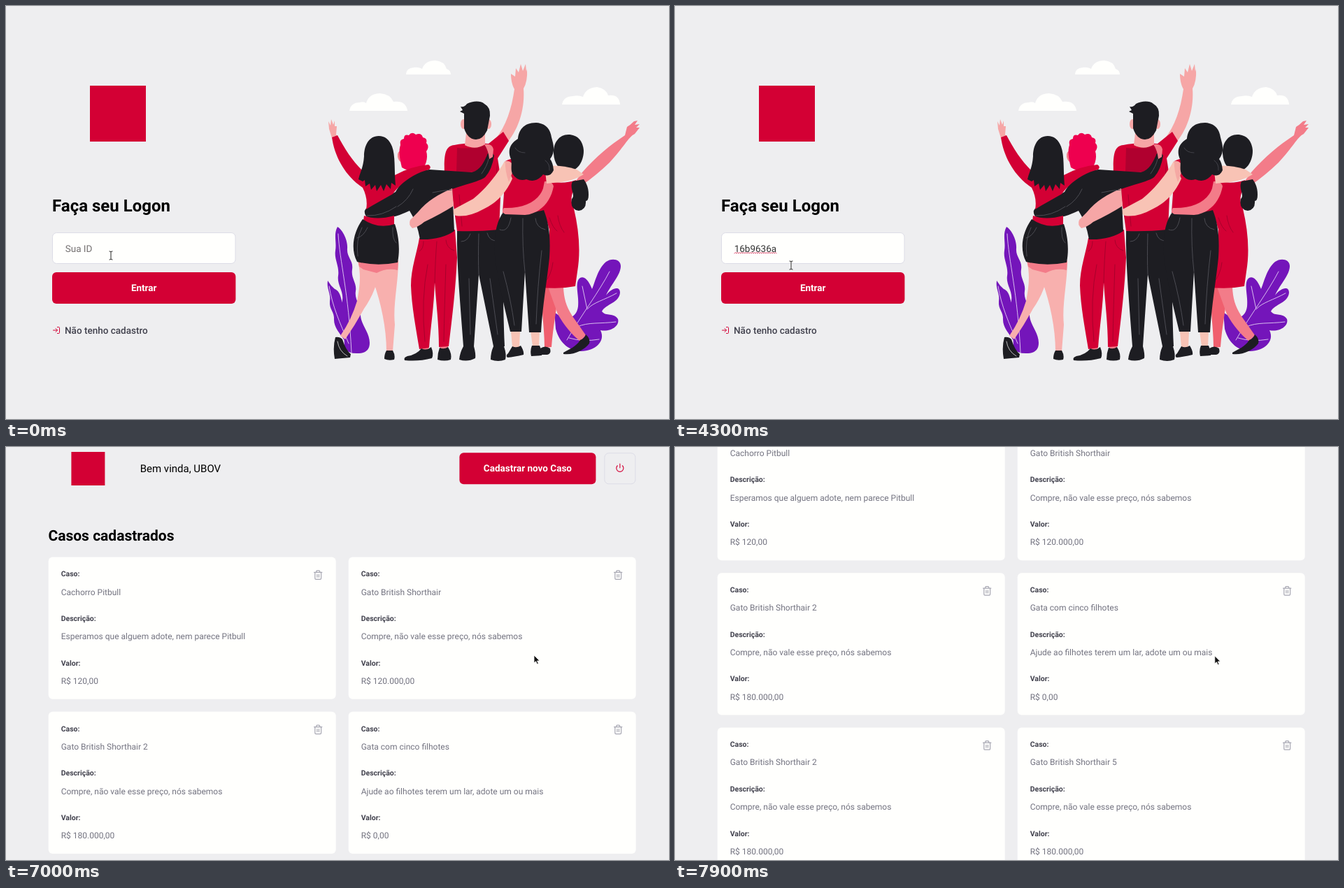
An HTML page that plays this animation: 948 px wide and 591 px high, repeating every 8000 ms.

```html
<!DOCTYPE html>
<html lang="pt-BR">
<head>
<meta charset="utf-8">
<title>Logon</title>
<style>
html, body { margin: 0; width: 100%; height: 100%; overflow: hidden; background: #eeeef0; }
svg { display: block; width: 948px; height: 591px; }
text { font-family: Roboto, sans-serif; text-rendering: geometricPrecision; white-space: pre; }
</style>
</head>
<body>
<svg id="stage" viewBox="0 0 948 591" xmlns="http://www.w3.org/2000/svg"></svg>
<script>
const LOOP = 8000;
const RED = '#d30034', WHITE = '#fffffd', BORDER = '#dcdce6', INK = '#41414d', GRAY = '#737380';
const DARK = '#1d1d22', SEAM = '#4b4b52', DEEP = '#a8002c', HOT = '#ee004f';
const PINK = '#f6a6a6', BLUSH = '#f8b0ae', ROSE = '#f37c89', PEACH = '#f8c3b5', PURPLE = '#7415ba', VEIN = '#e3cff3';

const shape = (fill, d) => `<path fill="${fill}" d="${d}"/>`;
const line = (color, width, d) =>
  `<path fill="none" stroke="${color}" stroke-width="${width}" stroke-linecap="round" stroke-linejoin="round" d="${d}"/>`;
const text = (x, y, size, weight, fill, s, extra = '') =>
  `<text x="${x}" y="${y}" font-size="${size}" font-weight="${weight}" fill="${fill}" ${extra}>${s}</text>`;
const box = (x, y, w, h, fill, stroke = 'none', r = 6) =>
  `<rect x="${x}" y="${y}" width="${w}" height="${h}" rx="${r}" fill="${fill}" stroke="${stroke}"/>`;
const icon = (x, y, size, color, d) =>
  `<g transform="translate(${x} ${y}) scale(${size / 24})">${line(color, 2, d)}</g>`;
const group = (id, body) => `<g id="${id}">${body}</g>`;
const centered = 'text-anchor="middle"';

function scenery() {
  return [
    shape(WHITE, 'M572 98Q572 89 583 88Q590 87 595 90Q599 78 614 78Q627 79 630 90Q636 92 636 98Z'),
    shape(WHITE, 'M491 150Q493 138 506 138Q511 136 515 139Q519 125 535 125Q549 126 554 137Q572 135 574 150Z'),
    shape(WHITE, 'M795 141Q797 129 811 129Q818 127 825 130Q829 117 845 116Q858 118 861 128Q877 126 878 141Z'),
    shape(PURPLE, 'M474 316C468 327 473 337 471 350C469 363 477 372 475 386C473 399 483 407 481 421C480 433 486 444 483 460L484 490Q489 498 505 497Q520 496 520 482C520 466 506 455 507 440C508 429 498 421 500 408C502 396 493 390 495 377C497 364 487 360 488 347C489 334 480 319 474 316Z'),
    shape(PURPLE, 'M460 393C458 405 465 411 463 423C462 434 470 438 469 449C469 460 477 468 485 480L495 462C486 450 491 439 484 430C478 422 480 409 470 405Q464 400 460 393Z'),
    line(VEIN, .9, 'M475 326C477 365 490 410 494 496M462 401C467 431 477 452 490 483'),
    shape(PURPLE, 'M784 438C802 453 816 446 818 430C820 415 812 395 821 389C829 385 835 398 838 405C842 396 846 376 858 366C866 360 879 362 879 372C879 385 866 397 858 414C866 403 878 400 878 410C877 425 858 426 852 437C858 445 869 438 875 448C878 458 864 467 850 464C858 480 842 494 822 494C806 493 792 484 786 462Z'),
    line(VEIN, .9, 'M863 380C848 409 824 440 802 478M824 401L831 434M873 411C855 421 840 424 832 433M800 449L819 458M872 452C850 455 832 452 817 459M848 477Q825 481 805 475')
  ].join('');
}

function ponytailWoman() {
  return [
    shape(ROSE, 'M806 262L824 238C843 216 864 199 885 185L888 173Q893 170 898 165L903 164L899 170L906 169L901 174L906 174L899 183C890 187 883 203 863 224Q838 248 812 264Z'),
    shape('#f05f6e', 'M767 400L791 402C788 430 782 460 780 488L770 489C770 456 764 430 767 400Z'),
    shape(ROSE, 'M775 402L797 403C798 418 800 428 810 444Q820 458 829 471L821 480C809 470 798 457 789 441Z'),
    shape(DARK, 'M764 490Q771 485 778 490Q780 498 774 499L763 499ZM797 496C805 491 815 488 821 478Q827 476 829 470Q836 476 834 483C826 493 811 500 797 498Z'),
    shape(RED, 'M774 250Q796 256 815 249C812 266 804 274 812 290C819 320 822 350 817 380L814 401Q788 406 761 402C767 385 775 370 776 355L777 320L768 290Z'),
    line(DEEP, 1, 'M789 300Q791 315 798 324M777 303Q782 318 788 322M770 396Q780 385 782 367'),
    shape(DARK, 'M804 184C791 184 782 196 783 211C784 226 791 236 804 237C817 236 826 223 826 207C825 193 817 184 804 184Z')
  ].join('');
}

function tallMan() {
  return [
    shape(PINK, 'M700 190C715 172 723 147 727 119C723 112 722 103 722 97L728 101L729 89L733 95L736 83L739 93L743 83L744 94L745 90Q746 108 740 118C742 144 735 173 717 195Z'),
    shape(DARK, 'M645 320L704 318C712 350 710 420 713 487H697L676 384L669 487H654C650 430 644 370 645 320Z'),
    line(SEAM, 1, 'M676 326Q675 360 676 384M651 337Q660 337 664 326M688 325Q691 337 703 336M662 390L664 470M692 390L703 470'),
    shape(DARK, 'M654 487H669Q672 498 671 504Q660 510 648 506Q649 496 654 487ZM697 487H712Q716 499 714 506Q704 510 693 506Q693 496 697 487Z'),
    shape(RED, 'M641 199Q660 195 690 197L711 180L719 193L703 218L708 250L705 320Q675 323 645 322L637 264L627 240C626 213 628 200 641 199Z'),
    shape('#b0002f', 'M645 203Q665 205 686 199L697 213L683 237L644 238Z'),
    shape(PINK, 'M658 182H685V198Q671 207 656 199Z'),
    `<ellipse cx="654" cy="169" rx="4" ry="7" fill="${PINK}"/><ellipse cx="690" cy="169" rx="4" ry="7" fill="${PINK}"/>`,
    shape(DARK, 'M655 154L649 151L653 149L650 144Q656 145 659 140C667 136 678 135 684 140Q693 145 692 157L688 178Q681 192 671 191Q660 190 655 175Z'),
    line(DEEP, 1, 'M648 270L652 315M703 225Q700 240 703 255')
  ].join('');
}

function curlyWoman() {
  return [
    shape(PEACH, 'M722 466H735L734 488H724ZM750 465H763L762 487H753Z'),
    shape(DARK, 'M724 487Q730 490 736 486Q741 494 740 499Q727 502 717 503Q714 500 718 497ZM752 486H763Q767 496 766 500L751 501Q749 493 752 486Z'),
    shape(RED, 'M714 222Q736 211 770 229Q785 239 781 254Q770 274 771 294Q741 301 710 296L712 268Q705 245 714 222Z'),
    shape(DARK, 'M712 294C698 310 696 345 701 372C706 405 715 440 721 466H737L742 380L748 467H765C767 430 774 390 777 360C779 330 776 310 769 292Q742 300 712 294Z'),
    line(SEAM, 1, 'M739 304Q738 345 742 380M706 320Q718 325 722 303M757 304Q758 317 771 320M711 380Q722 420 727 457M766 350Q760 400 758 455'),
    shape(PEACH, 'M713 222C704 238 689 259 668 276L640 291Q636 296 643 300Q661 303 684 290Q711 277 724 247Z'),
    shape('#f5a9a4', 'M714 222Q724 220 726 233L719 252Q713 235 714 222Z'),
    shape(ROSE, 'M770 251Q781 250 783 258C779 280 764 297 742 299L714 298Q707 295 712 289C739 290 761 281 768 261Z'),
    shape(DARK, 'M826 248Q833 257 833 270Q833 279 829 279Q830 291 819 293Q806 291 809 276C815 270 805 262 810 251Z'),
    shape(PEACH, 'M770 229Q794 227 816 234L826 241Q814 249 794 252L773 254Z'),
    shape(DARK, 'M758 167C739 167 733 179 732 190C720 197 717 208 722 219C724 226 721 233 724 240Q732 252 744 248Q758 254 768 241Q778 246 783 235Q782 224 778 219C786 208 783 199 780 188Q777 168 758 167Z'),
    line(SEAM, .8, 'M771 221Q778 226 777 235M728 203Q732 210 742 210')
  ].join('');
}

function redHairMan() {
  return [
    shape(ROSE, 'M594 484H604V494H596ZM620 484H632V493H621Z'),
    shape(RED, 'M591 332L642 320L645 360C643 405 638 445 633 487L619 488C619 455 615 425 613 396C612 430 607 460 605 489L591 491C586 460 580 430 579 400C579 375 588 352 591 332Z'),
    line(DEEP, 1, 'M616 337Q614 360 613 396M597 337Q597 348 591 351M629 335Q630 347 641 350M603 370Q593 420 599 480M629 370Q627 430 626 480'),
    shape(DARK, 'M594 490Q601 494 608 488Q612 498 609 504Q590 509 570 507Q568 503 574 501Q587 499 594 490ZM620 489Q626 492 632 488Q638 498 636 506Q627 509 617 506Q617 497 620 489Z'),
    shape(ROSE, 'M573 222H598V238L574 240ZM566 207Q559 207 560 216Q562 225 569 223Z'),
    shape(DARK, 'M605 234C580 237 566 250 557 266L519 287Q509 292 515 301Q525 308 542 304C558 302 570 296 577 293Q588 310 592 334Q622 335 641 322L638 262C656 255 675 252 685 245Q695 234 698 214Q694 207 689 211C684 222 679 235 666 238Z'),
    shape(ROSE, 'M684 198Q695 196 697 205L696 216L691 219Q690 207 684 198Z'),
    shape(PINK, 'M638 261C619 269 602 279 589 295L578 306Q575 313 581 318Q590 316 598 309C614 301 628 294 640 286Z'),
    line(SEAM, 1, 'M610 267Q623 264 637 263M582 262Q575 278 560 287M680 240Q688 229 690 219'),
    shape(HOT, 'M566 231C563 218 561 207 564 199Q562 191 569 190Q569 183 576 185Q580 179 586 184Q594 181 596 188Q603 189 601 196Q606 201 601 208C604 218 600 230 593 235Q578 239 566 231Z')
  ].join('');
}

function longHairWoman() {
  return [
    shape(PINK, 'M466 189L462 176L461 165L464 171L465 162L468 170L470 164L470 172L473 172L472 184L475 188Z'),
    shape(BLUSH, 'M503 364L536 367C533 395 523 418 512 433Q500 455 485 477L478 472Q494 449 502 422C506 402 508 385 503 364ZM522 380L536 366L561 365C561 396 553 428 556 456L553 494H544C544 460 536 425 526 396Z'),
    shape(ROSE, 'M503 364Q535 370 561 364L560 378Q545 374 530 382L511 377L505 373Z'),
    shape(DARK, 'M471 474Q477 473 481 477Q486 493 493 498L492 503L470 505Q467 488 471 474ZM544 493H553Q557 500 555 506Q547 508 541 505Q541 498 544 493Z'),
    line(WHITE, .7, 'M474 480Q476 494 488 501'),
    shape(RED, 'M466 188L474 185C484 204 495 221 509 235L556 242Q580 229 604 227Q609 230 605 234C581 240 563 255 553 269L523 286L515 291C517 280 515 270 510 260C485 243 470 216 466 188ZM512 300Q530 307 555 300V316Q532 321 511 308Z'),
    shape(DARK, 'M510 305Q532 320 556 312C561 327 564 347 560 367Q530 373 502 366C492 347 497 323 510 305Z'),
    line(SEAM, 1, 'M509 317Q500 335 503 358M517 317Q511 330 502 332M553 317Q552 334 558 339M516 300Q538 301 558 287'),
    shape(DARK, 'M533 186C518 186 512 201 512 215C511 231 506 239 504 248L510 251L513 249L514 258L520 254L522 263L528 256L530 265L536 256L540 265L544 255L550 262L551 253L557 257C555 235 557 214 552 201Q546 186 533 186Z')
  ].join('');
}

function loginPage() {
  return [
    box(120, 114, 80, 80, RED, 'none', 0),
    text(66, 294, 24, 700, '#000', 'Faça seu Logon'),
    box(66.5, 324.5, 261.5, 44, WHITE, BORDER),
    text(84.7, 352, 13.5, 400, '#757171', 'Sua ID', 'id="field"'),
    `<rect id="caret" x="85" y="339" width="1" height="16" fill="#222"/>`,
    `<g id="squiggle">${line('#d8365c', .9, 'M85 354' + 'l1.5-1.3 1.5 1.3'.repeat(20))}</g>`,
    `<rect id="enter" x="66" y="381" width="262.4" height="45" rx="6"/>`,
    text(197.2, 408.3, 13.5, 700, WHITE, 'Entrar', centered),
    icon(66, 458, 12, RED, 'M15 3h4a2 2 0 0 1 2 2v14a2 2 0 0 1-2 2h-4M10 17l5-5-5-5M15 12H3'),
    text(84, 468.8, 13.5, 500, INK, 'Não tenho cadastro'),
    scenery(), ponytailWoman(), tallMan(), curlyWoman(), redHairMan(), longHairWoman()
  ].join('');
}

const CHEAP = 'Compre, não vale esse preço, nós sabemos';
const CASES = [
  ['Cachorro Pitbull', 'Esperamos que alguem adote, nem parece Pitbull', '120,00'],
  ['Gato British Shorthair', CHEAP, '120.000,00'],
  ['Gato British Shorthair 2', CHEAP, '180.000,00'],
  ['Gata com cinco filhotes', 'Ajude ao filhotes terem um lar, adote um ou mais', '0,00'],
  ['Gato British Shorthair 2', CHEAP, '180.000,00'],
  ['Gato British Shorthair 5', CHEAP, '180.000,00']
];

function card([name, about, value], i) {
  const x = 66.3 + i % 2 * 429, y = 157.6 + Math.floor(i / 2) * 221.25;
  const rows = [['Caso:', name], ['Descrição:', about], ['Valor:', 'R$ ' + value]];
  return box(x, y, 411, 203.2, WHITE) +
    rows.map(([label, s], k) =>
      text(x + 18, y + 27.7 + k * 63.75, 10.5, 700, INK, label) +
      text(x + 18, y + 54 + k * 63.75, 12, 400, GRAY, s)).join('') +
    icon(x + 378, y + 18, 15, '#a8a8b3',
      'M3 6h18M19 6v14a2 2 0 0 1-2 2H7a2 2 0 0 1-2-2V6M8 6V4a2 2 0 0 1 2-2h4a2 2 0 0 1 2 2v2M10 11v6M14 11v6');
}

function profilePage() {
  return [
    box(99, 7, 48, 48, RED, 'none', 0),
    text(197.3, 36, 15, 400, '#000', 'Bem vinda, UBOV'),
    box(654, 8.3, 195, 45, RED),
    text(751.5, 35.4, 13.5, 700, WHITE, 'Cadastrar novo Caso', centered),
    box(861.5, 8.8, 44, 44, 'none', BORDER),
    icon(876.7, 23, 13.5, RED, 'M18.36 6.64a9 9 0 1 1-12.73 0M12 2v10'),
    text(66, 134.4, 21, 700, '#000', 'Casos cadastrados'),
    group('cards', CASES.map(card).join(''))
  ].join('');
}

const pointers = {
  beam: line(WHITE, 2.4, 'M0-5V5') + line('#222', 1, 'M-2-6Q0-6 0-5Q0-6 2-6M0-5V5M-2 6Q0 6 0 5Q0 6 2 6'),
  arrow: `<path d="M0 0V11L2.6 8.7 4.5 12.8 6.3 12 4.5 8H8Z" fill="#111" stroke="${WHITE}" stroke-width=".8"/>`,
  hand: `<path d="M-1 0Q0-1.2 1 0V4L5.5 5Q7 5.5 6.7 7L6 11.5H0L-3.5 7Q-3.5 5.5-1 7Z" fill="${WHITE}" stroke="#111" stroke-width=".9"/>`
};

document.getElementById('stage').innerHTML =
  group('login', loginPage()) + group('profile', profilePage()) +
  group('pointer', Object.keys(pointers).map(k => group(k, pointers[k])).join(''));

const $ = id => document.getElementById(id);
const show = (id, on) => $(id).setAttribute('display', on ? 'inline' : 'none');
const within = (t, a, b) => t >= a && t < b;

// time, x, y, kind: each holds until the next
const MOVES = [
  [0, 150, 357, 'beam'], [600, 151, 356, 'beam'], [700, 151, 354, 'beam'],
  [4100, 153, 358, 'beam'], [4200, 160, 366, 'beam'], [4300, 166, 371, 'beam'],
  [4900, 191, 406, 'hand'], [5500, 189.5, 406, 'arrow'], [6300, 188.5, 405, 'arrow'],
  [6600, 204, 401, 'arrow'], [6700, 290, 380, 'arrow'], [6800, 430, 348, 'arrow'],
  [6900, 600, 318, 'arrow'], [7000, 755, 298, 'arrow'], [7100, 841, 292, 'arrow'],
  [7200, 798, 296, 'arrow'], [7300, 771.8, 299, 'arrow']
];

function draw(now) {
  const t = Math.floor(now % LOOP / 100) * 100;
  const onLogin = t < 5500;
  show('login', onLogin);
  show('profile', !onLogin);

  const step = (t - 3700) / 100;
  const typed = step < 0 ? 0 : Math.min(8, Math.floor((step + 1) * 8 / 7));
  const field = $('field');
  field.textContent = typed ? '16b9636a'.slice(0, typed) : 'Sua ID';
  field.setAttribute('fill', typed ? '#333' : '#757171');
  show('caret', within(t, 700, 1300) || within(t, 1900, 2800) || within(t, 3100, 4300));
  $('caret').setAttribute('x', 85 + Math.round(typed * 7.58));
  show('squiggle', within(t, 4300, 5100));
  $('enter').setAttribute('fill', t >= 4900 ? '#be002f' : RED);

  // the scrollbar of the filled list narrows the page
  show('cards', t >= 5800);
  const scroll = t < 7500 ? 0 : 9.8 + 188.8 * (t - 7500) / 400;
  $('profile').setAttribute('transform', `translate(${t >= 5800 ? -5.6 : 0} ${-scroll})`);

  const [, x, y, kind] = MOVES.filter(m => m[0] <= t).pop();
  for (const k in pointers) show(k, k === kind);
  $('pointer').setAttribute('transform', `translate(${x} ${y})`);
}

const start = performance.now();
(function tick() {
  draw(performance.now() - start);
  requestAnimationFrame(tick);
})();
</script>
</body>
</html>
```
